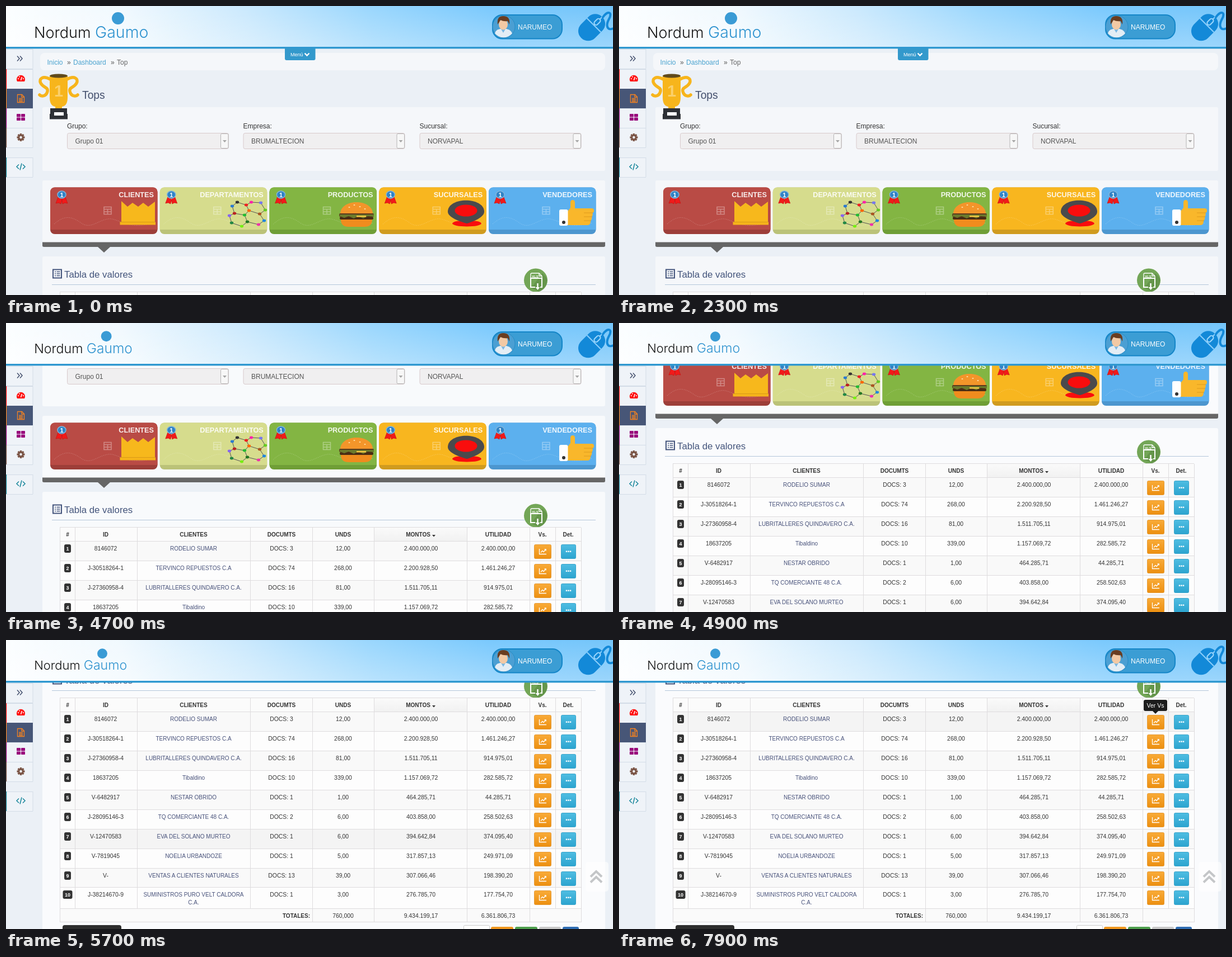
An HTML page that plays this animation: 1084 px wide and 517 px high, repeating every 8000 ms.

```html
<!DOCTYPE html>
<html lang="es">
<head>
<meta charset="utf-8">
<title>Tops</title>
<style>
  html, body { margin: 0; width: 100%; height: 100%; overflow: hidden; background: #ebf0f6; }
  svg { display: block; width: 100%; height: 100%; font-family: "Liberation Sans", Arial, sans-serif; }
</style>
</head>
<body>
<svg id="stage" viewBox="0 0 1084 517" xmlns="http://www.w3.org/2000/svg"></svg>
<script>
const LOOP = 8000;
const BLUE = '#3399cc';

// ---- markup helpers ----
const attrs = o => Object.entries(o).map(([k, v]) => ` ${k}="${v}"`).join('');
const tag = (name, o, inner = '') => `<${name}${attrs(o)}>${inner}</${name}>`;
const rect = (x, y, width, height, fill, o = {}) => tag('rect', { x, y, width, height, fill, ...o });
const oval = (cx, cy, rx, ry, fill, o = {}) => tag('ellipse', { cx, cy, rx, ry, fill, ...o });
const path = (d, fill, o = {}) => tag('path', { d, fill, ...o });
const line = (d, stroke, w = 1, o = {}) => path(d, 'none', { stroke, 'stroke-width': w, ...o });
const text = (x, y, s, size, fill, o = {}) => tag('text', { x, y, 'font-size': size, fill, ...o }, s);
const group = (o, ...parts) => tag('g', o, parts.join(''));
const at = (x, y, ...parts) => group({ transform: `translate(${x} ${y})` }, ...parts);
const MID = { 'text-anchor': 'middle' };
const END = { 'text-anchor': 'end' };
const BOLD = { 'font-weight': 700 };
const ROUND = { 'stroke-linecap': 'round', 'stroke-linejoin': 'round' };

const gradient = (id, stops, o = {}) => tag('linearGradient', { id, ...o },
  stops.map(([offset, color, alpha = 1]) =>
    tag('stop', { offset, 'stop-color': color, 'stop-opacity': alpha })).join(''));
const DOWN = { x2: 0, y2: 1 };

const defs = tag('defs', {},
  gradient('sky', [[0, '#fcfeff'], [.2, '#f1f9fe'], [.4, '#cbe9fd'], [.6, '#9bd7fd'], [.8, '#7ac9fd'], [1, '#74c5fa']],
    { gradientUnits: 'userSpaceOnUse', x1: 0, y1: 60, x2: 1000, y2: -260 }) +
  gradient('mist', [[0, '#fff', 0], [1, '#fff', .28]], DOWN) +
  gradient('amber', [[0, '#f9ab38'], [1, '#ec8f10']], DOWN) +
  gradient('cyan', [[0, '#4fbde2'], [1, '#2ca4cf']], DOWN) +
  gradient('shade', [[0, '#fafafa'], [1, '#f1f1f1']], DOWN));

// ---- page parts ----
const panel = (x, y, w, h, r = 3) => rect(x, y, w, h, '#fff', { rx: r, class: 'panel' });

const trophy = () => group({},
  line('M79 131C66 124 58 130 62 138S76 145 74 153 64 163 60 159M109 131c13-7 21-1 17 7s-14 7-12 15 10 10 14 6',
    '#f7b51c', 5.5, ROUND),
  path('M78 125h32v38q0 16-10 17v5H88v-5q-10-1-10-17z', '#f7b51c'),
  oval(94, 125, 16, 3.5, '#5f4a1c'),
  text(94, 162, '1', 29, '#fbd06a', { ...MID, ...BOLD }),
  path('M79 183h30v10h1v9.500H78V193h1z', '#2d3035'),
  rect(86, 190, 17, 6, '#fff'));

const select = (x, label, value) => group({},
  text(x, 219, label, 12, '#333'),
  rect(x + .5, 227.5, 288, 28, '#f0eff0', { rx: 3, stroke: '#d8cacc' }),
  rect(x + 274.5, 228.5, 13.5, 26, '#f7f7f7', { rx: 2, stroke: '#b5b5b5' }),
  path(`M${x + 278} 240h7l-3.500 4z`, '#a5a5a5'),
  text(x + 14.5, 246, value, 12, '#555'));

const medal = () => group({},
  path('M14 18l-4 11 5-1 4 2 3-10zM27 18l4 11-5-1-4 2-2-10z', '#f11a1a', { stroke: '#c40d0d', 'stroke-width': .6 }),
  oval(20.5, 13.5, 7.5, 6.5, '#2f83c6', { stroke: '#7fb4dc', 'stroke-width': 1.5 }),
  text(20.5, 17.5, '1', 11, '#fff', { ...MID, ...BOLD }));

const sheetIcon = () => group({ opacity: .35 },
  line('M96 35.500h13v13H96zM96 39.500h13M102.500 39v9M96 44h13', '#fff', 1.5));

const card = (i, title, fill, base) => at(79 + i * 195.75, 324,
  rect(0, .5, 191.5, 83.5, base, { rx: 8 }),
  path('M8 .5h175.500a8 8 0 0 1 8 8V76H0V8.500a8 8 0 0 1 8-8z', fill),
  line('M7 66C25 50 38 52 55 64S84 60 103 57 135 78 185 64', '#fff', 1, { opacity: .35, 'stroke-dasharray': '1 2' }),
  sheetIcon(), medal(),
  text(185, 18, title, 12.7, '#fff', { ...END, ...BOLD, opacity: .9 }));

const crown = () => group({ id: 'crown' },
  path('M206 349l11 10 9-7 10 7 9-7 9 7 12-9v36h-60z', '#f7b81c'),
  rect(203.5, 386, 63.5, 5.5, '#f6b41a'),
  line('M204 386.500h63', '#d99a17', 1));

function molecule() {
  const p = [[404, 358], [413, 351], [429, 356], [438, 351], [455, 352], [463, 365], [453, 372], [461, 384],
    [451, 391], [431, 386], [421, 394], [403, 388], [399, 375], [408, 371], [426, 374], [434, 366]];
  const hues = ['#2b7bd0', '#333', '#e22', '#f2a', '#77e', '#6c2', '#a52', '#28d', '#e3a', '#272', '#7e1', '#284', '#86e', '#b22', '#2b3', '#f60'];
  const chain = ids => 'M' + ids.map(i => p[i].join(' ')).join('L');
  const d = chain([0, 1, 2, 3, 4, 5, 6, 7, 8, 9, 10, 11, 12, 13, 0]) + chain([13, 14, 9]) + chain([14, 15, 2]) + chain([15, 6]);
  return line(d, '#555', 1) + p.map(([x, y], i) => oval(x, y, 3.2, 2.4, hues[i])).join('');
}

const burger = () => group({},
  path('M597 372c0-28 58-28 58 0z', '#f3952a'),
  path('M598 382h56q0 13-14 13h-28q-14 0-14-13z', '#f08c1e'),
  rect(595, 371, 62, 6, '#5b3a1c', { rx: 2 }),
  rect(596, 377, 60, 5, '#4a2d14', { rx: 2 }),
  path('M596 376l8 3 8-3 9 4 8-4 9 4 8-4 11 1v-4h-61z', '#6b7a2c'),
  rect(626, 375, 17, 2.5, '#f6c944'),
  [[613, 360], [622, 356], [632, 359], [641, 363]].map(([x, y]) => oval(x, y, 1.5, 1, '#ffe0a8')).join(''));

const pin = () => group({},
  oval(823, 389, 26, 5.5, '#f90d0d'),
  path('M789 368c0-27 65-27 65 0 0 10-20 18-31 21-12-3-34-11-34-21z', '#4a4a4c'),
  oval(821.5, 366, 20, 10.5, '#f90d0d'));

const thumb = () => group({},
  path('M1003 367l5-6v-9q0-5 4-5t4 5v10h30q4 0 4 4t-3 4q2 4-1 7 1 5-2 7 0 8-5 8h-36z', '#f9b72b'),
  line('M1032 370h16M1032 377h15M1032 384h13', '#dd9a1d', 1),
  rect(988, 364, 15.5, 29, '#fff', { rx: 3 }),
  oval(996, 387, 3, 3, '#333'));

const listIcon = () => group({},
  line('M84 471.500h15v15H84z', '#44557c', 2),
  line('M87 475.500h2m1.500 0h6M87 479h2m1.500 0h6M87 482.500h2m1.500 0h6', '#44557c', 1.5));

const xls = () => group({},
  oval(946, 490.5, 21, 21, '#73a657'),
  path('M958 478l8 9a21 21 0 0 1-14 24l-14-7z', '#5d8d44', { opacity: .6 }),
  line('M937 487v-7q0-2 2-2h13l5 5v4M952 478v5h5', '#fff', 1.3),
  line('M945 503h-8v-16h20v16h-3', '#fff', 2),
  text(945, 485.5, 'XLS', 6, '#fff', { ...MID, ...BOLD }),
  line('M949.500 496v9', '#fff', 2.4), path('M945.500 503h8l-4 5z', '#fff'));

// ---- table ----
const COLS = [96, 123, 234, 436, 547, 657, 823, 935, 981, 1027];
const MIDS = [110, 178, 335, 492, 602, 741, 879, 958, 1004];
const HEADS = ['#', 'ID', 'CLIENTES', 'DOCUMTS', 'UNDS', 'MONTOS', 'UTILIDAD', 'Vs.', 'Det.'];
const ROWS = `8146072|RODELIO SUMAR|3|12,00|2.400.000,00|2.400.000,00
J-30518264-1|TERVINCO REPUESTOS C.A|74|268,00|2.200.928,50|1.461.246,27
J-27360958-4|LUBRITALLERES QUINDAVERO C.A.|16|81,00|1.511.705,11|914.975,01
18637205|Tibaldino|10|339,00|1.157.069,72|282.585,72
V-6482917|NESTAR OBRIDO|1|1,00|464.285,71|44.285,71
J-28095146-3|TQ COMERCIANTE 48 C.A.|2|6,00|403.858,00|258.502,63
V-12470583|EVA DEL SOLANO MURTEO|1|6,00|394.642,84|374.095,40
V-7819045|NOELIA URBANDOZE|1|5,00|317.857,13|249.971,09
V-|VENTAS A CLIENTES NATURALES|13|39,00|307.066,46|198.390,20
J-38214670-9|SUMINISTROS PURO VELT CALDORA/C.A.|1|3,00|276.785,70|177.754,70`
  .split('\n').map(r => r.split('|'));
const TOP = 512, BODY = 537, STEP = 34.94, FOOT = 889, LAST = 913;
const rowTop = i => Math.round(BODY + i * STEP);
const cell = (x, y, s, fill = '#333', size = 10.4) => text(x, y, s, size, fill, MID);

function row([id, name, docs, ...nums], i) {
  const y = rowTop(i), base = y + 16, wide = i > 8 ? 17 : 12;
  return rect(96, y, 931, i > 8 ? FOOT - y : STEP, '#fff', { class: 'row' }) +
    rect(110 - wide / 2, y + 5, wide, 15, '#333', { rx: 3 }) +
    text(110, base, i + 1, 9, '#fff', { ...MID, ...BOLD }) +
    cell(MIDS[1], base, id) +
    name.split('/').map((s, k) => cell(MIDS[2], base + k * 14, s, '#47517a', 10)).join('') +
    cell(MIDS[3], base, 'DOCS: ' + docs) +
    nums.map((s, k) => cell(MIDS[4 + k], base, s)).join('') +
    at(943, y + 5,
      rect(.5, .5, 30, 25, 'url(#amber)', { rx: 2, stroke: '#e69a35' }),
      line('M9.500 8v9.500H22M12 14.500l3-3 2 2 4-4.500M18.500 8.800h2.700v2.700', '#fff', 1.3)) +
    at(991, y + 5,
      rect(.5, .5, 26, 25, 'url(#cyan)', { rx: 2, stroke: '#3aa5cb', class: 'det' }),
      [10, 13.5, 17].map(x => rect(x - 1.2, 11.5, 2.4, 2.4, '#fff')).join(''));
}

function table() {
  const rules = [TOP, ...ROWS.map((_, i) => rowTop(i)), FOOT, LAST];
  const grid = rules.map(y => `M96 ${y - .5}H1027`).join('') +
    COLS.map((x, i) => `M${x + .5} ${TOP}V${i && i < 4 || i === 8 ? FOOT : LAST}`).join('');
  const bold = (x, y, s, o = MID) => text(x, y, s, 10, '#333', { ...o, ...BOLD });
  return rect(96, TOP, 931, BODY - TOP, '#fbfbfb') + rect(657, TOP, 166, BODY - TOP, 'url(#shade)') +
    HEADS.map((s, i) => bold(MIDS[i] - (i === 5 ? 5 : 0), 528, s)).join('') +
    path('M761 525h6l-3 3.500z', '#333') +
    ROWS.map(row).join('') +
    rect(96, FOOT, 931, LAST - FOOT, '#fafafa') +
    bold(543, 905, 'TOTALES:', END) +
    ['760,000', '9.434.199,17', '6.361.806,73'].map((s, i) => cell(MIDS[4 + i], 905, s)).join('') +
    line(grid, '#dedcde') +
    rect(101, 918, 105, 28, '#2e2e2e', { rx: 4 }) +
    rect(817.5, 918.5, 46, 26, '#fff', { rx: 2, stroke: '#ccc' }) +
    [[866, 40, '#f0971f'], [909, 40, '#4ea04e'], [952, 39, '#c9c9c9'], [994, 29, '#2f6db3']]
      .map(([x, w, c]) => rect(x, 921, w, 26, c, { rx: 3 })).join('');
}

const content = () => group({ id: 'content' },
  panel(61, 84, 1009, 31, 8),
  text(73.5, 105, 'Inicio', 12, '#4aa3cf'), text(109, 105, '»', 12, '#555'),
  text(120, 105, 'Dashboard', 12, '#4aa3cf'), text(187, 105, '»', 12, '#555'),
  text(198, 105, 'Top', 12, '#666'),
  panel(65, 181, 1005, 114), panel(65, 312, 1005, 111), panel(65, 448, 1005, 620),
  trophy(), text(136, 166, 'Tops', 19.3, '#44506e'),
  select(109, 'Grupo:', 'Grupo 01'),
  select(423.5, 'Empresa:', 'BRUMALTECION'),
  select(738.5, 'Sucursal:', 'NORVAPAL'),
  [['CLIENTES', '#b94b45', '#9d3e39'], ['DEPARTAMENTOS', '#d6dc8d', '#bbc278'], ['PRODUCTOS', '#83b543', '#6f9e36'],
    ['SUCURSALES', '#f8b61f', '#d09b1f'], ['VENDEDORES', '#5cb0ee', '#4c96cf']].map((c, i) => card(i, ...c)).join(''),
  crown(), molecule(), burger(), pin(), thumb(),
  path('M65 422.500h1005v6q0 2.500-3 2.500H186l-11 10-11-10H68q-3 0-3-2.500z', '#666'),
  listIcon(), text(104, 486, 'Tabla de valores', 16.8, '#44557c'),
  line('M82 498.500H1053', '#b4c6da'),
  xls(), table());

// ---- fixed parts ----
const slot = (y, accent) => rect(0, y, 48, 35, '#eff3f8') +
  line(`M0 ${y + .5}H48M0 ${y + 35.5}H48M48 ${y}v35`, '#d3dce7') + rect(0, y, 1.2, 35, accent);

const teeth = [0, 45, 90, 135].map(a => rect(24.8, 228, 3.4, 14, '#7b5546', { transform: `rotate(${a} 26.5 235)` })).join('');

const sidebar = () => group({ id: 'side' },
  slot(77, '#dfe6ee'), slot(113, '#f11'), slot(183, '#990a7c'), slot(218, '#7b5546'), slot(271, '#17869a'),
  rect(0, 148, 48, 35, '#475677'), rect(0, 148, 1.2, 35, '#f58220'),
  line('M20 89.500l4 4.500-4 4.500M25 89.500l4 4.500-4 4.500', '#44506e', 1.5),
  path('M20 135a7.500 7.500 0 1 1 13 0z', '#f11'),
  line('M26.500 133l2-6', '#fff', 1.5),
  [[22, 130], [24, 126.5], [31, 130]].map(([x, y]) => oval(x, y, 1, 1, '#fff')).join(''),
  line('M20.500 158.500h8l4 4v10h-12zM28 158.500v4.500h4.500M23 165.500h7M23 168h7M23 170.500h7', '#f58220', 1.3),
  [[19, 193], [27, 193], [19, 199.5], [27, 199.5]].map(([x, y]) => rect(x, y, 7, 5.5, '#990a7c', { rx: .8 })).join(''),
  teeth, oval(26.5, 235, 5.2, 5.2, '#7b5546'), oval(26.5, 235, 2.2, 2.2, '#eff3f8'),
  line('M23 283.500l-4 4 4 4M30 283.500l4 4-4 4M28 281.500l-3 12', '#17869a', 1.5));

const avatar = () => group({},
  oval(889, 37, 20, 20, '#4b9fd3', { stroke: '#2a8cc6' }),
  path('M873 49q1-6 9-8h12q8 2 10 8a20 20 0 0 1-31 0z', '#e3edf5'),
  path('M884 41h8l-4 7z', '#79b7e3'),
  oval(888, 33, 8, 9.5, '#f3c9a4'),
  path('M878 33q-2-15 10-15 13 0 11 15l-3-6q-8 1-13-2-2 4-5 8z', '#6a3d20'));

const mouse = () => group({},
  group({ transform: 'rotate(45 1046 39)' },
    rect(1028, 12, 35, 53, '#1389d8', { rx: 17 }),
    line('M1028 33h35M1045.500 12v21', '#8dcffb', 2),
    rect(1042, 18, 7, 13, '#1389d8', { rx: 3.5, stroke: '#9bd6fc', 'stroke-width': 2 })),
  line('M1066 20c8-12 18-10 11 3s-3 23 10 16', '#1389d8', 4, ROUND));

const header = () => group({},
  rect(0, 0, 1084, 74, 'url(#sky)'), rect(0, 0, 1084, 74, 'url(#mist)'),
  rect(0, 73, 1084, 3.4, '#2f98d0'),
  group({ id: 'brand', 'font-family': 'Inter, sans-serif', 'font-weight': 300 },
    oval(200, 22, 11, 11, '#3a9bd5'),
    text(50, 57, 'Nordum', 27, '#151515'), text(159, 57, 'Gaumo', 28.5, '#2f93cf')),
  rect(869, 16, 124, 42.5, '#3b9dd4', { rx: 17, stroke: '#1486c8', 'stroke-width': 2 }),
  avatar(),
  text(914, 42, 'NARUMEO', 12, '#fff', { id: 'user' }),
  mouse(),
  group({ id: 'menu' },
    path('M498 76h54.500v18q0 3-3 3H501q-3 0-3-3z', BLUE),
    text(508, 90, 'Menú', 9, '#fff'),
    line('M533.500 84.500l4 4 4-4', '#fff', 2.4)));

const toTop = () => group({ id: 'totop' },
  rect(1035, 397, 41, 53, '#fff', { rx: 5, opacity: .6 }),
  line('M1044 423.500l10-9.500 10 9.500M1044 433.500l10-9.500 10 9.500', '#c4c6c8', 4));

const tip = () => group({ id: 'tip' },
  path('M940 107h36q3 0 3 3v14q0 3-3 3h-13l-5 5-5-5h-13q-3 0-3-3v-14q0-3 3-3z', '#1c1c1c'),
  text(958, 121, 'Ver Vs', 10.5, '#fff', MID));

const stage = document.getElementById('stage');
stage.innerHTML = defs + rect(0, 0, 1084, 517, '#ebf0f6') + content() + sidebar() + toTop() + header() + tip();

// ---- motion ----
const $ = id => document.getElementById(id);
const [page, side, brand, menu, user, crownEl, topEl, tipEl] =
  ['content', 'side', 'brand', 'menu', 'user', 'crown', 'totop', 'tip'].map($);
const rows = [...document.querySelectorAll('.row')];
const panels = [...document.querySelectorAll('.panel')];
const firstDet = document.querySelector('.det');

const ramp = (t, a, b) => Math.min(1, Math.max(0, (t - a) / (b - a)));
const SCROLL = [[4400, 0], [4500, 24], [4700, 146], [4900, 260], [5100, 303], [5300, 318], [5500, 382], [5700, 408]];
const HOVER = [[5700, 6], [6400, 5], [6500, 4], [6600, 2], [6700, 1], [7000, 0]];

function track(keys, t) {
  let v = keys[0][1];
  for (let i = 1; i < keys.length; i++)
    v += (keys[i][1] - keys[i - 1][1]) * ramp(t, keys[i - 1][0], keys[i][0]);
  return v;
}

function draw(ms) {
  const t = Math.floor(ms / 100) * 100;
  const y = Math.round(track(SCROLL, t));
  page.setAttribute('transform', `translate(0 ${-y})`);
  // the sidebar scrolls for one step before it sticks
  side.setAttribute('transform', `translate(0 ${t === 4500 ? -y : 0})`);

  const s = track([[4400, 1], [4500, .97], [4700, .86], [4900, .812]], t);
  brand.setAttribute('transform', `translate(${51 * (1 - s)} ${34 * (1 - s)}) scale(${s})`);
  menu.setAttribute('visibility', t < 4500 ? 'visible' : 'hidden');

  const clear = .52 + .24 * ramp(t, 4400, 4900);
  panels.forEach(p => p.setAttribute('opacity', clear));
  user.setAttribute('opacity', .92 + .08 * ramp(t, 200, 400));
  crownEl.setAttribute('opacity', 1 - .25 * Math.sin(Math.PI * ramp(t, 1300, 2300)));
  topEl.setAttribute('opacity', ramp(t, 4900, 5300));

  const hot = HOVER.reduce((h, [from, i]) => t >= from ? i : h, -1);
  rows.forEach((r, i) => r.setAttribute('fill', i === hot ? '#f4f4f4' : i % 2 ? '#fdfdfd' : '#f9f9f9'));
  firstDet.setAttribute('fill', t === 7500 || t === 7600 ? '#2f9dc4' : 'url(#cyan)');
  tipEl.setAttribute('opacity', ramp(t, 7600, 7900));
}

const start = performance.now();
function tick() {
  draw((performance.now() - start) % LOOP);
  requestAnimationFrame(tick);
}
tick();
</script>
</body>
</html>
```
